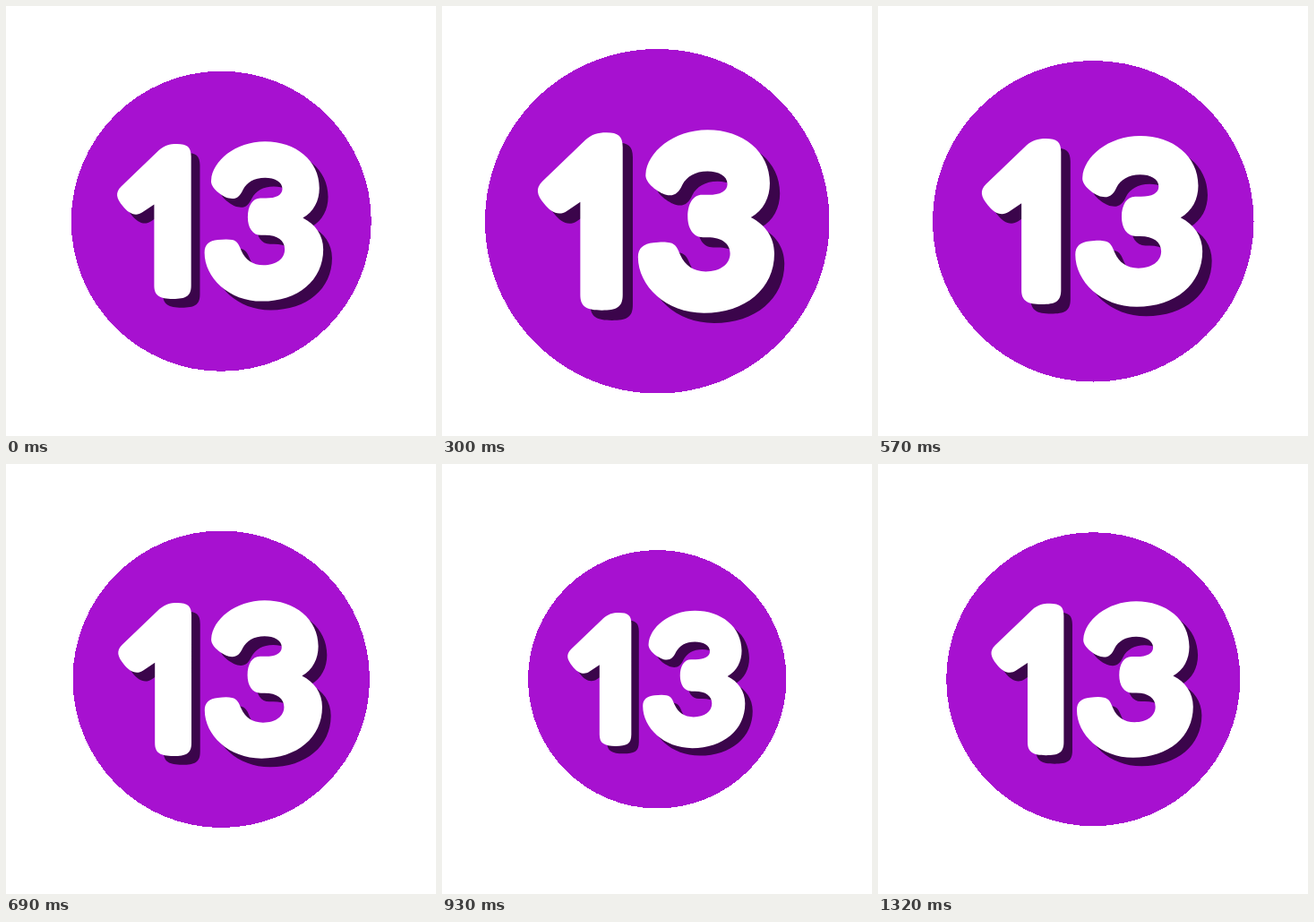
These frames come from a looping animation (480 px wide and 480 px high, 1.35 s). An HTML page:

```html
<!DOCTYPE html>
<html lang="en">
<head>
<meta charset="utf-8">
<title>Pulsing 13</title>
<style>
  html, body { margin: 0; width: 100%; height: 100%; overflow: hidden; background: #fff; }
  svg { display: block; width: 100vw; height: 100vh; }
</style>
</head>
<body>
<svg viewBox="-240.25 -240.25 480 480">
  <defs>
    <g id="digits" transform="scale(.8779) translate(-240.25 -240.25)">
      <path d="M155 219L140 229C131 235 122 230 115 221C107 211 105 204 113 196L161 150
        C168 144 174 142 184 142C197 142 202 146 202 158V322C202 336 195 339 179 339
        C162 339 155 335 155 322Z"/>
      <path d="M227.5 188C229 164 258 139 296 139C335 139 365 163 365 198C365 214 358 228 344 236
        C360 244 370 258 370 276C370 315 338 342 292 342C250 342 219 312 219 280
        C219 270 225 265 236 264C244 263 250 263 254 264C261 265 263 271 266 278
        C271 289 280 296 294 296C310 296 321 288 321 276C321 265 312 258 296 258H291
        C280 258 274 248 274 235C274 221 280 211 290 211H297C310 211 318 207 318 199
        C318 190 308 185 296 185C282 185 273 191 268 200C264 209 259 213 250 211
        C242 209 226 198 227.5 188Z"/>
    </g>
  </defs>
  <g id="badge">
    <circle r="167.5" fill="#a711d0" shape-rendering="crispEdges"/>
    <use href="#digits" x="9.8" y="9.8" fill="#3b054b"/>
    <use href="#digits" fill="#fff"/>
  </g>
</svg>
<script>
  const LOOP = 1350, STEP = 30;
  const badge = document.getElementById('badge');
  const start = performance.now();

  function draw(now) {
    const time = Math.floor(Math.max(0, now - start) % LOOP / STEP) * STEP;
    const scale = 1 + 0.15 * Math.sin(2 * Math.PI * time / LOOP);
    badge.setAttribute('transform', `scale(${scale})`);
    requestAnimationFrame(draw);
  }
  draw(start);
</script>
</body>
</html>
```
